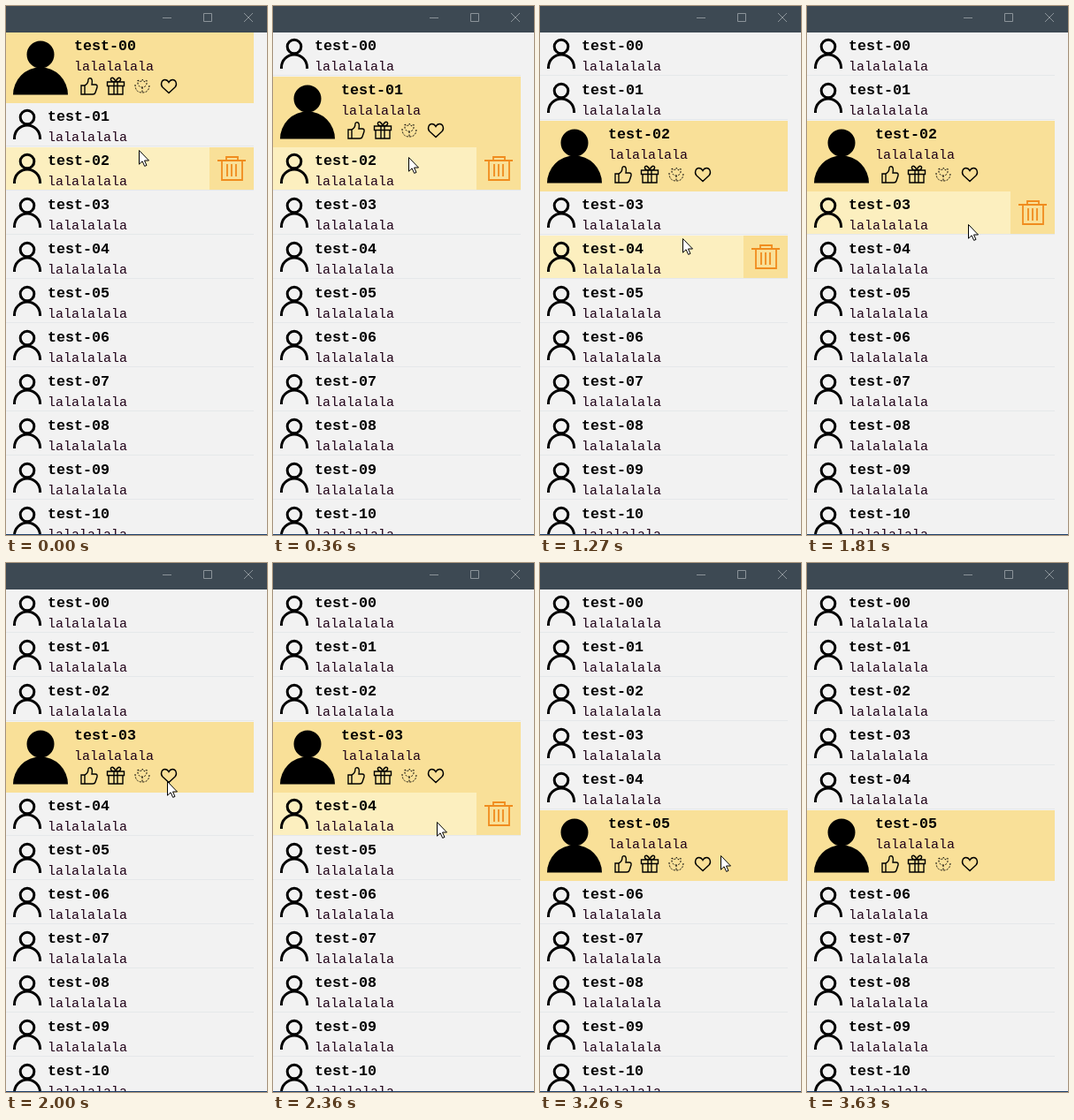
Recreate the animation shown at these times as an HTML page with a canvas. Size 295 by 599 pixels, loop 4.12 s.

```html
<!DOCTYPE html>
<html lang="en">
<head>
<meta charset="utf-8">
<title>Expanding contact list</title>
<style>
  html, body { margin: 0; width: 100%; height: 100%; overflow: hidden; background: #f2f2f2; }
  canvas { display: block; }
</style>
</head>
<body>
<canvas id="stage" width="295" height="599"></canvas>
<script>
const ctx = document.getElementById('stage').getContext('2d');
const LOOP = 4120, TICK = 181;
const ROWS = 11, TOP = 30, CLOSED = 50, OPEN = 80;
const GOLD = '#f9e098', PALE = '#fcefbf', ORANGE = '#f08c1e', BLACK = '#000';

// Times are in ticks. Every click opens the next row.
const clicks = [2, 4, 11, 14, 18];
const pointerKeys = [
  [0, 150, 163], [1, 151, 150], [3, 154, 191], [4, 153, 190], [6, 161, 272],
  [8, 160, 254], [10, 182, 247], [11, 182, 247], [13, 185, 293], [14, 185, 293],
  [17, 205, 331], [18, 204, 331], [19, 212, 374]
];

const path = d => new Path2D(d);
const person = path('M16.200 16a7.800 7.800 0 1 1 15.600 0a7.800 7.800 0 1 1-15.600 0M9.500 41V39.500a14.500 14.500 0 0 1 29 0V41');
const bust = path('M23.500 25a15.500 15.500 0 1 1 31 0a15.500 15.500 0 1 1-31 0M8 70.500a31 31 0 0 1 62 0z');
const trash = path('M9 15H41M19 15V11H32V15M14 15V37H37V15M20 19V33M25 19V33M30 19V33');
const arrow = path('M.5 .5V16.200L4.100 12.800 6.700 18.400 9 17.400 6.500 12H11.500z');
const windowButtons = path('M177 13.500H187M223.500 8.500H232.500V17.500H223.500zM269 8L279 18M279 8L269 18');
const icons = [
  path('M-9-1H-5V9H-9zM-5-1Q-1-3-1-8Q0-10 2-9Q4-8 3-2H7Q9.500-2 9 1L7 7Q6.500 9 4 9H-5'),
  path('M-9.500-5H9.500V-.5H-9.500zM-8-.5V9H8V-.5M-2-5V9M2-5V9M0-5C-8-5-6-11-3-9.500Q-1-8.500 0-5C8-5 6-11 3-9.500Q1-8.500 0-5'),
  path('M-5-7L-2-5 0-8 2-5 5-7V-3Q4 1 0 1Q-4 1-5-3zM-8-2Q-8 7 0 7Q8 7 8-2M0 1V7'),
  path('M0 7.500L-7 1C-10-2-8-7.500-4.500-7.500Q-1.500-7.500 0-4.500Q1.500-7.500 4.500-7.500C8-7.500 10-2 7 1z')
];
const FLOWER = 2;
const iconX = i => 94 + 30 * i;

function rect(color, x, y, w, h) {
  ctx.fillStyle = color;
  ctx.fillRect(x, y, w, h);
}

function shape(d, x, y, { fill, stroke, width = 1, dash = [] }) {
  ctx.save();
  ctx.translate(x, y);
  if (fill) {
    ctx.fillStyle = fill;
    ctx.fill(d);
  }
  if (stroke) {
    ctx.strokeStyle = stroke;
    ctx.lineWidth = width;
    ctx.setLineDash(dash);
    ctx.stroke(d);
  }
  ctx.restore();
}

function label(index, x, y) {
  ctx.fillStyle = BLACK;
  ctx.font = 'bold 16.67px "Liberation Mono", monospace';
  ctx.fillText('test-' + String(index).padStart(2, '0'), x, y + 20);
  ctx.fillStyle = '#200018';
  ctx.font = '15px "Liberation Mono", monospace';
  ctx.fillText('lalalalala', x, y + 43);
}

function openRow(index, y, pointer, live) {
  rect(GOLD, 0, y, 280, OPEN);
  shape(bust, 0, y, { fill: BLACK });
  label(index, 77, y);
  icons.forEach((icon, i) => {
    const lit = live && pointer && Math.hypot(pointer.x - iconX(i), pointer.y - y - 61) < 18;
    const pen = i === FLOWER ? { dash: [2, 1.5] } : { width: 1.4 };
    shape(icon, iconX(i), y + 61, { stroke: lit ? ORANGE : BLACK, ...pen });
  });
}

function closedRow(index, y, hovered) {
  rect('#e5e8ea', 0, y + 48, 280, 1);
  if (hovered) {
    rect(PALE, 0, y, 230, 48);
    rect(GOLD, 230, y, 50, 48);
    shape(trash, 230, y, { stroke: ORANGE, width: 1.8 });
  }
  shape(person, 0, y, { stroke: BLACK, width: 3 });
  label(index, 47, y);
}

function pointerAt(tick) {
  const next = pointerKeys.findIndex(key => key[0] > tick);
  const [t0, x0, y0] = pointerKeys.at(next < 0 ? -1 : next - 1);
  if (next < 0) return tick > t0 ? null : { x: x0, y: y0 };
  const [t1, x1, y1] = pointerKeys[next];
  const mix = (a, b) => Math.round(a + (b - a) * (tick - t0) / (t1 - t0));
  return { x: mix(x0, x1), y: mix(y0, y1) };
}

function draw(time) {
  const tick = Math.floor(time / TICK + 0.04);
  const open = clicks.filter(click => click <= tick).length;
  const pointer = pointerAt(tick);

  rect('#f2f2f2', 0, 0, 295, 599);
  for (let i = 0, y = TOP; i < ROWS; i++) {
    const height = i === open ? OPEN : CLOSED;
    const hovered = pointer && pointer.y >= y && pointer.y < y + height;
    // Icons react only once the pointer moves after a click.
    if (i === open) openRow(i, y, pointer, !clicks.includes(tick));
    else closedRow(i, y, hovered);
    y += height;
  }

  rect('#3d4953', 0, 0, 295, TOP);
  shape(windowButtons, 0, 0, { stroke: '#8b9399' });
  rect('#1c3d68', 0, 598, 295, 1);
  if (pointer) shape(arrow, pointer.x, pointer.y, { fill: '#fff', stroke: BLACK });
}

function animate() {
  draw(performance.now() % LOOP);
  requestAnimationFrame(animate);
}
animate();
</script>
</body>
</html>
```
